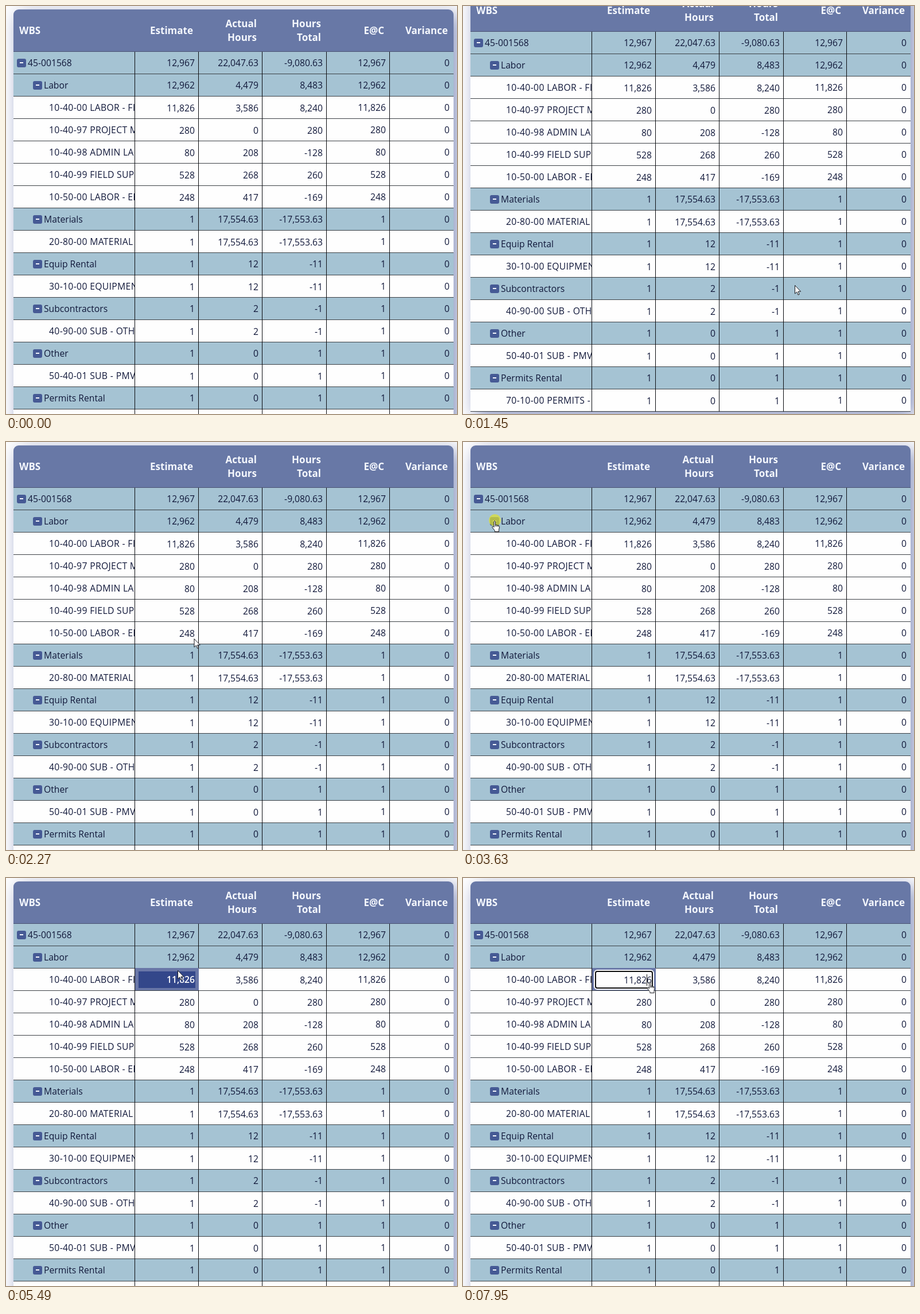
Write an HTML page that moves like this. It is 786 px wide and 712 px high and loops after 8 s.

```html
<!DOCTYPE html>
<html lang="en">
<head>
<meta charset="utf-8">
<title>Estimate grid</title>
<style>
html, body { margin: 0; width: 100%; height: 100%; overflow: hidden; background: #fefefe; }
#stage {
  position: relative; width: 786px; height: 712px; overflow: hidden; background: #fefefe;
  font: 500 15.7px/38px "Open Sans", "Noto Sans", sans-serif; color: #11183a;
}
#stage * { box-sizing: border-box; }

/* every part shares the 8 s loop */
.sheet, #cursor, #cursor > *, .cell, .caret { animation: 8s step-end infinite; }

.sheet {
  position: absolute; left: 13px; border-radius: 9px 9px 0 0;
  box-shadow: 8px 8px 30px #5a68a5b3;
}
#full { top: 6px; --cols: 212px 111px 111px 112px 110px 111px; animation-name: scroll, expanded; }
#folded { top: 84px; --cols: 214px 113px 112px 112px 112px 112px; animation-name: collapsed; }

.head, .row { display: grid; grid-template-columns: var(--cols); white-space: pre; }
.head {
  height: 74px; align-items: center; padding-top: 1px; border-radius: 9px 9px 0 0;
  border-bottom: 1px solid #4a5272; background: #6878a6; color: #f5f8fe;
  font-weight: 700; font-size: 17px; line-height: 24px; text-align: right;
}
.head span { padding-right: 10px; }
.head span:first-child { padding-left: 10px; text-align: left; }

.row { height: 39px; border-bottom: 1px solid #3c4146; background: #fefefe; }
.row.group { background: #a5c3d3; }
.row span {
  position: relative; overflow: hidden; padding-right: 6px; text-align: right;
  border-right: 1px solid #0b0c10; height: 39px;
}
.row span:last-child { border-color: transparent; }
.row span:first-child { padding: 0 0 0 var(--indent); text-align: left; }
.leaf span:first-child { letter-spacing: .35px; }
.leaf span:nth-child(n+2):nth-child(-n+4) { padding-top: 1px; }

.toggle {
  position: absolute; left: calc(var(--indent) - 19px); top: 12px;
  width: 16px; height: 15px; border-radius: 3px; background: #465a95;
}
.toggle::before, .toggle.plus::after {
  content: ""; position: absolute; left: 5px; top: 6px; width: 6px; height: 2px; background: #f4f7ff;
}
.toggle.plus::before { left: 4px; width: 8px; }
.toggle.plus::after { left: 7px; top: 3px; width: 2px; height: 8px; }

.cell {
  position: absolute; left: 225px; top: 157px; width: 111px; height: 39px;
  background: #6977a7; text-align: right;
}
.cell div { position: absolute; line-height: 29px; }
#hover { animation-name: hover; }
#hover div {
  left: 6px; top: 6px; width: 99px; height: 29px; padding-right: 1px;
  background: #33478a; color: #fff; font-weight: 600;
}
#edit { animation-name: edit; }
#edit div {
  left: 5px; top: 5px; width: 101px; height: 31px; padding-right: 0;
  border: 2px solid #101010; border-radius: 4px; background: #fefefe;
  box-shadow: 0 0 0 2px #fdfdff; line-height: 28px;
}
.caret { position: absolute; left: 104px; top: 11px; width: 1px; height: 20px; background: #111; animation-name: caret; }

#cursor { position: absolute; left: 0; top: 0; animation-name: move; }
#cursor > * { position: absolute; overflow: visible; }
#cursor path { fill: #fff; stroke: #15161c; stroke-width: 1; stroke-linejoin: round; }
#ring {
  left: -10.5px; top: -11.5px; width: 21px; height: 21px; border-radius: 50%;
  background: #dfe22cb8; animation-name: press;
}
#arrow { left: 0; top: 0; animation-name: arrow; }
#hand { left: -5px; top: 0; animation-name: hand; }

@keyframes scroll {
  0% { transform: none; }
  14.74% { transform: translateY(-9.5px); }
  15.6% { transform: translateY(-22px); }
  16.5% { transform: translateY(-31px); }
  17.4% { transform: translateY(-35px); }
  19% { transform: translateY(-37px); }
  23.1% { transform: translateY(-30px); }
  23.98% { transform: translateY(-19.5px); }
  24.8% { transform: translateY(-10px); }
  25.7% { transform: translateY(-4px); }
  26.6%, 100% { transform: none; }
}
@keyframes expanded { 0%, 60.24%, 100% { opacity: 1; } 47% { opacity: 0; } }
@keyframes collapsed { 0%, 60.24%, 100% { opacity: 0; } 47% { opacity: 1; } }
@keyframes hover { 0%, 71.1%, 87.7%, 100% { opacity: 0; } 68.4%, 77.5% { opacity: 1; } }
@keyframes edit { 0% { opacity: 0; } 87.7%, 100% { opacity: 1; } }
@keyframes caret { 0% { transform: none; } 95.95%, 100% { transform: translateX(-9px); } }
@keyframes press {
  0%, 47%, 60.24%, 87%, 88.6%, 96.85%, 100% { opacity: 0; }
  45.35%, 58.6%, 86.1%, 87.7%, 95.95% { opacity: 1; }
}
@keyframes hand { 0%, 47%, 60.24% { opacity: 0; } 39.6%, 55.6%, 87.7%, 100% { opacity: 1; } }
@keyframes arrow { 0%, 47%, 60.24% { opacity: 1; } 39.6%, 55.6%, 87.7%, 100% { opacity: 0; } }
@keyframes move {
  0% { transform: translate(800px, 720px); }
  .87% { transform: translate(800px, 720px); animation-timing-function: steps(7, start); }
  6.4% { transform: translate(584px, 486px); }
  14.74% { transform: translate(578px, 487px); }
  23.1% { transform: translate(574px, 489px); }
  23.98% { transform: translate(569px, 491px); }
  24.8% { transform: translate(569px, 491px); animation-timing-function: steps(10, start); }
  33.4% { transform: translate(86px, 195px); }
  33.45% { transform: translate(86px, 195px); animation-timing-function: steps(5, start); }
  37.5% { transform: translate(59px, 129px); }
  39.6% { transform: translate(59px, 129px); animation-timing-function: steps(6, start); }
  44.8% { transform: translate(55px, 137px); }
  47.9% { transform: translate(55px, 137px); animation-timing-function: steps(10, start); }
  57.5% { transform: translate(52.5px, 219.5px); }
  60.24% { transform: translate(52px, 217px); }
  65.2% { transform: translate(52px, 217px); animation-timing-function: steps(5, start); }
  69.2% { transform: translate(299px, 161px); }
  71.1% { transform: translate(299px, 161px); animation-timing-function: steps(4, start); }
  74.6% { transform: translate(298px, 143px); }
  75.95% { transform: translate(298px, 143px); animation-timing-function: steps(4, start); }
  79% { transform: translate(295px, 172px); }
  91.85% { transform: translate(322px, 181px); }
  99.35%, 100% { transform: translate(325.5px, 181px); }
}
</style>
</head>
<body>
<div id="stage">
  <div class="sheet" id="full"></div>
  <div class="sheet" id="folded"></div>
  <div class="cell" id="hover"><div>11,826</div></div>
  <div class="cell" id="edit"><div>11,826</div><i class="caret"></i></div>
  <div id="cursor">
    <div id="ring"></div>
    <svg id="arrow" width="12" height="19"><path d="M.5 .5V15L3.8 11.9 6 17.2 8.2 16.2 6 11.2H10.6Z"/></svg>
    <svg id="hand" width="15" height="21"><path d="M4 1.8C4 .3 6.4 .3 6.4 1.8V7.4L11.8 8.8C13.4 9.3 13.7 10.4 13.4 12L12.5 16.3V19.6H5.4V17.6L1 12C.3 10.7 1.8 9.6 2.8 10.6L4 11.8Z"/><path d="M6.4 7.4V10.5M8.8 8.4V10.8M11.2 9V11.2"/></svg>
  </div>
</div>
<script>
const titles = ["WBS", "Estimate", "Actual\nHours", "Hours\nTotal", "E@C", "Variance"];

// level | label | estimate | actual | total
const lines = `0|45-001568|12,967|22,047.63|-9,080.63
1|Labor|12,962|4,479|8,483
2|10-40-00 LABOR - FIELD|11,826|3,586|8,240
2|10-40-97 PROJECT MANAGER|280|0|280
2|10-40-98 ADMIN LABOR|80|208|-128
2|10-40-99 FIELD SUPERVISION|528|268|260
2|10-50-00 LABOR - ENGINEERING|248|417|-169
1|Materials|1|17,554.63|-17,553.63
2|20-80-00 MATERIAL|1|17,554.63|-17,553.63
1|Equip Rental|1|12|-11
2|30-10-00 EQUIPMENT|1|12|-11
1|Subcontractors|1|2|-1
2|40-90-00 SUB - OTHER|1|2|-1
1|Other|1|0|1
2|50-40-01 SUB - PMV|1|0|1
1|Permits Rental|1|0|1
2|70-10-00 PERMITS -|1|0|1`.split("\n").map(line => line.split("|"));

const indents = [25, 53, 62];
const spans = texts => texts.map(text => `<span>${text}</span>`).join("");

function row([level, label, estimate, actual, total], folded) {
  const leaf = level === "2";
  const sign = folded && label === "Labor" ? "toggle plus" : "toggle";
  const name = leaf ? label : `<i class="${sign}"></i>${label}`;
  return `<div class="row ${leaf ? "leaf" : "group"}" style="--indent:${indents[level]}px">` +
    spans([name, estimate, actual, total, estimate, 0]) + "</div>";
}

function fill(id, list, folded) {
  document.getElementById(id).innerHTML =
    `<div class="head">${spans(titles)}</div>` + list.map(line => row(line, folded)).join("");
}

fill("full", lines, false);
fill("folded", lines.filter((line, i) => i < 2 || i > 6), true);
</script>
</body>
</html>
```
